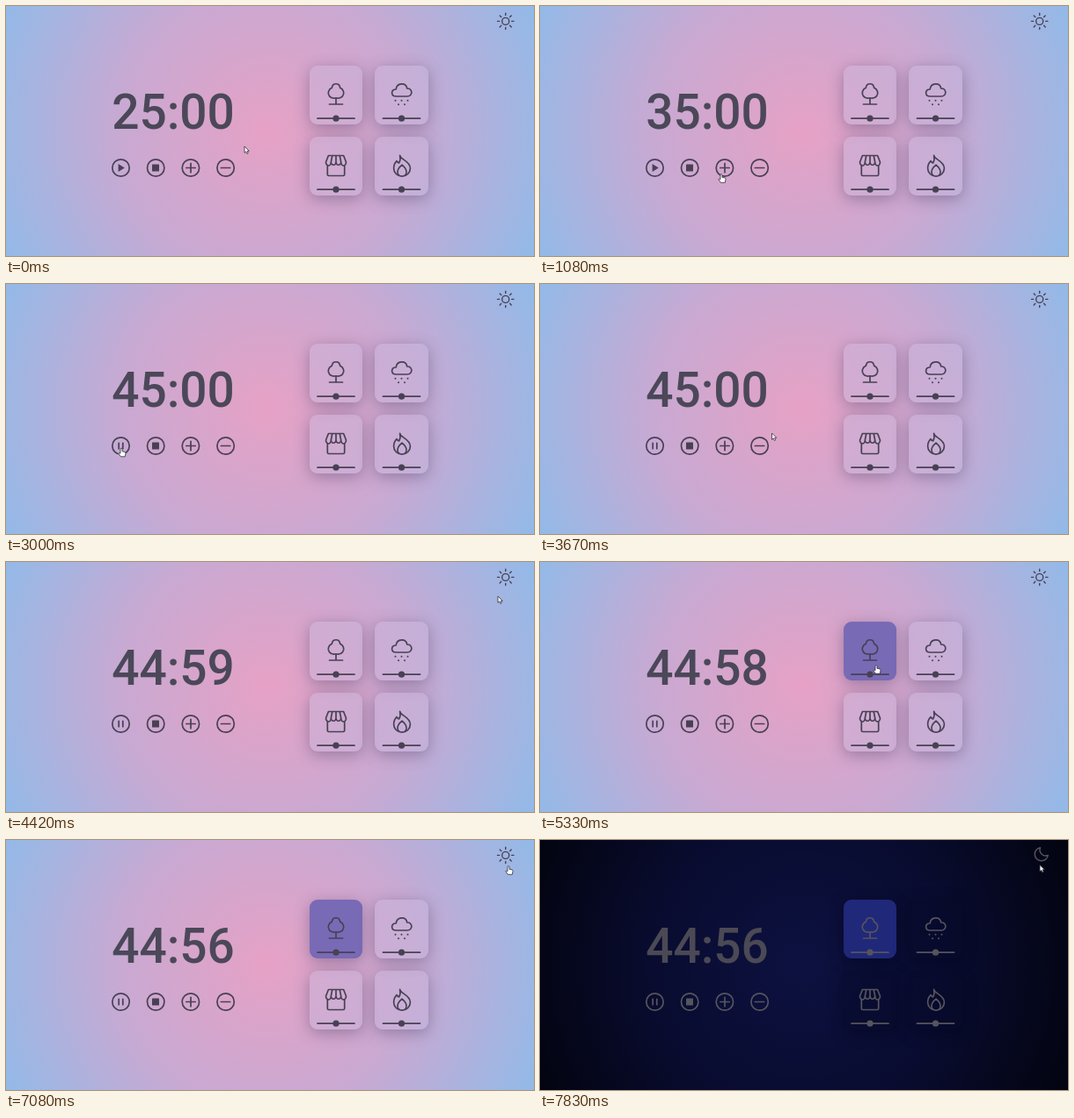
Write an HTML page that moves like this. It is 600 px wide and 285 px high and loops after 8000 ms.

```html
<!DOCTYPE html>
<html lang="en">
<head>
<meta charset="utf-8">
<title>Focus timer</title>
<style>
  html, body { margin: 0; width: 100%; height: 100%; overflow: hidden; }
  #stage {
    --ink: #484154; --text: #4b4859; --card: rgba(198, 182, 220, .4);
    --on: #796ab6; --shade: rgba(68, 62, 98, .42);
    position: relative; width: 600px; height: 285px; overflow: hidden;
    background: radial-gradient(circle at 298px 142px, #e6a1c5 0, #c9a9d2 165px, #95b9e7 325px);
  }
  #stage.dark {
    --ink: #56545d; --text: #4b4954; --card: rgba(6, 8, 36, .3);
    --on: #20287a; --shade: rgba(2, 2, 20, .4);
    background: radial-gradient(circle at 298px 142px, #0d1140 0, #090c30 165px, #030411 325px);
  }
  .card {
    position: absolute; width: 60.5px; height: 66.5px; border-radius: 9px;
    background: var(--card); box-shadow: 0 4px 17px var(--shade);
  }
  .card.on { background: var(--on); }
  svg { position: absolute; left: 0; top: 0; }
  .line { fill: none; stroke: var(--ink); stroke-width: 1.7; stroke-linecap: round; stroke-linejoin: round; }
  .solid { fill: var(--ink); }
  .thin { stroke-width: 1.4; }
  #clock { font: 500 55px Roboto, sans-serif; fill: var(--text); text-anchor: middle; }
  .pointer { fill: #fff; stroke: #302c3c; stroke-width: .8; stroke-linejoin: round; }
</style>
</head>
<body>
<div id="stage">
  <div id="cards"></div>
  <svg width="600" height="285" viewBox="0 0 600 285">
    <text id="clock" x="190" y="139.6">25:00</text>

    <g id="rings" class="line"></g>
    <path class="line" d="M204.8 184.5h10.4M210 179.3v10.4M244.3 184.5h10.4"/>
    <path id="play" class="solid" d="M127.6 180v9l7.2-4.5z"/>
    <path id="pause" class="line" d="M128.2 181.3v6.4M132.8 181.3v6.4"/>
    <rect class="solid" x="166" y="180.5" width="8" height="8" rx=".6"/>

    <!-- tree, cloud, shop, flame -->
    <g class="line">
      <path d="M370.3 93.3C371 87.2 379 87.2 379.7 93.3C383.6 95 385 99.4 382.6 102.6C380 105.8 377 105.4 375 104.8C373 105.4 370 105.8 367.4 102.6C365 99.4 366.4 95 370.3 93.3ZM375 104.8V112M367.5 112h15"/>
      <path d="M443.5 103C437 103 437 94.8 443.2 95C444.2 87.2 454.5 87 455.8 94C462.4 93.6 462.6 103 456 103Z"/>
      <path d="M366.4 170.5H383.6L386.5 178a2.9 4 0 0 1-5.8 0a2.9 4 0 0 1-5.7 0a2.9 4 0 0 1-5.7 0a2.9 4 0 0 1-5.8 0ZM369.3 178l1.5-7.5M375 178v-7.5M380.7 178l-1.5-7.5M365.3 182v10q0 1.5 1.5 1.5h16.4q1.5 0 1.5-1.5v-10"/>
      <path d="M447.6 170.4C448 175.2 459.4 176.4 459.4 185A9.4 9.2 0 0 1 440.6 185C440.6 181.5 442 178.6 444 176.6Q445 178.8 446.6 179C448 176.5 448.4 173.4 447.6 170.4ZM450 181.2C452.2 183 455 186 455 189.3A5 4.9 0 0 1 445 189.3C445 186 447.8 183 450 181.2Z"/>
    </g>
    <g id="snow" class="solid"></g>
    <g id="sliders"></g>

    <g id="sun" class="line thin" transform="translate(567.7 17.4)">
      <circle r="4"/>
      <g id="rays"></g>
    </g>
    <path id="moon" class="line thin" d="M568.5 8.7A6.8 6.8 0 0 0 577.3 17.5A7.6 7.6 0 1 1 568.5 8.7Z"/>

    <g id="cursor" class="pointer">
      <path id="arrow" d="M0 0V7.4L1.7 5.9L2.9 8.5L4.2 7.8L3.1 5.3H5.3Z"/>
      <path id="hand" d="M-1 .8Q0 -.8 1 .8V3.8L4 4.4Q5.2 4.7 5 6L4.3 9.8H-.6L-3.2 6.2Q-3 4.8 -1 6.2Z"/>
    </g>
  </svg>
</div>

<script>
const $ = id => document.getElementById(id);
const LOOP = 8000, TICK = 1000 / 12;
const ADD = 740, ADD_GAP = 333, START = 3000, SELECT = 5240, NIGHT = 7830;

const repeat = (n, make) => Array.from({ length: n }, (_, i) => make(i));
const buttons = repeat(4, i => ({ x: 130.5 + i * 39.7, y: 184.5, w: 21, h: 21 }));
const cards = repeat(4, i => ({ x: 375 + i % 2 * 74.5, y: 101.7 + (i >> 1) * 81, w: 60.5, h: 66.5 }));
const hotspots = [...buttons, ...cards, { x: 568, y: 18, w: 26, h: 30 }];

// pointer moves; it rests in between
const HOME = { x: 271, y: 160 };
const MOVES = [
  { from: 80, to: 660, x: 206, y: 191.5 },
  { from: 2200, to: 2830, x: 131, y: 187 },
  { from: 3080, to: 3660, x: 263.5, y: 170 },
  { from: 3670, to: 4410, x: 559, y: 39 },
  { from: 4420, to: 5240, x: 382, y: 117.5 },
  { from: 5830, to: 6570, x: 571, y: 29.5 },
  { from: 7820, to: NIGHT, x: 568, y: 28.5 }
];

$('cards').innerHTML = cards.map(c =>
  `<div class="card" style="left:${c.x - c.w / 2}px;top:${c.y - c.h / 2}px"></div>`).join('');
$('rings').innerHTML = buttons.map(b => `<circle cx="${b.x}" cy="${b.y}" r="9.7"/>`).join('');
$('sliders').innerHTML = cards.map(c => `<g transform="translate(${c.x} ${c.y + 26.5})">
  <path class="line" d="M-21 0h42"/><circle class="solid" r="3.6"/></g>`).join('');
$('snow').innerHTML = repeat(5, i =>
  `<circle cx="${442.5 + i * 3.5}" cy="${i % 2 ? 112.2 : 107.8}" r="1"/>`).join('');
$('rays').innerHTML = repeat(8, i => `<path d="M7 0h2.2" transform="rotate(${i * 45})"/>`).join('');

const treeCard = $('cards').firstChild;
const show = (id, on) => { $(id).style.display = on ? 'inline' : 'none'; };
const clamp = (v, lo, hi) => Math.min(hi, Math.max(lo, v));
const ease = u => (u + u * u * (3 - 2 * u)) / 2;
const inside = (p, r) => Math.abs(p.x - r.x) <= r.w / 2 && Math.abs(p.y - r.y) <= r.h / 2;

function pointerAt(t) {
  return MOVES.reduce((p, m) => {
    const k = ease(clamp((t - m.from) / (m.to - m.from), 0, 1));
    return { x: p.x + (m.x - p.x) * k, y: p.y + (m.y - p.y) * k };
  }, HOME);
}

function clockAt(t) {
  const presses = clamp(Math.floor((t - ADD) / ADD_GAP) + 1, 0, 4);
  const spent = Math.max(0, Math.floor((t - START) / 1000));
  const left = 1500 + presses * 300 - spent;
  const pad = n => String(n).padStart(2, '0');
  return pad(Math.floor(left / 60)) + ':' + pad(left % 60);
}

function draw(now) {
  // the picture advances twelve times a second
  const t = Math.round(Math.floor((now % LOOP + 4) / TICK) * TICK);
  const night = t >= NIGHT, running = t >= START;
  const p = pointerAt(t);
  const hot = !night && hotspots.some(r => inside(p, r));

  $('clock').textContent = clockAt(t);
  $('stage').classList.toggle('dark', night);
  treeCard.classList.toggle('on', t >= SELECT);
  show('play', !running);
  show('pause', running);
  show('sun', !night);
  show('moon', night);
  show('hand', hot);
  show('arrow', !hot);
  $('cursor').setAttribute('transform', `translate(${p.x.toFixed(2)} ${p.y.toFixed(2)})`);
}

function frame() {
  draw(performance.now());
  requestAnimationFrame(frame);
}
frame();
</script>
</body>
</html>
```
